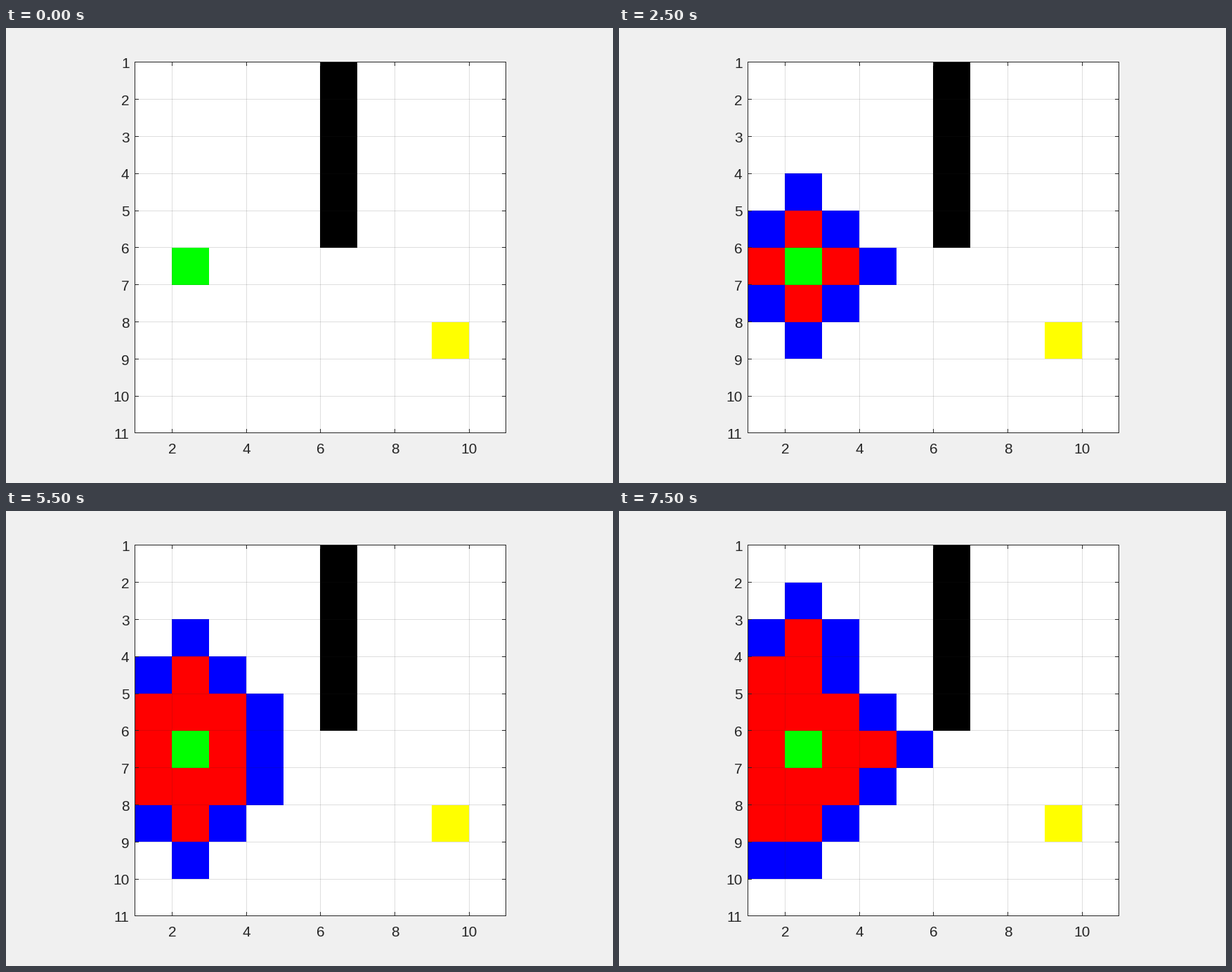
A matplotlib script for the animation above (8000 ms loop, 864 px wide and 648 px high).

```python
import math

import matplotlib.pyplot as plt
from matplotlib.animation import FuncAnimation
from matplotlib.patches import Rectangle

W, H, DPI = 864, 648, 100
N, STEPS = 10, 16
CELL, LEFT, TOP = 52.812, 183.26, 48.82
INK = (0.15, 0.15, 0.15)
START, GOAL = (2, 6), (9, 8)          # (column, row)
WALL = {(6, row) for row in range(1, 6)}


def edge_x(v):
    return math.floor(LEFT + CELL * (v - 1) + 0.5)


def edge_y(v):
    return math.floor(TOP + CELL * (v - 1) + 0.5)


def line_y(v):
    return math.floor(TOP + CELL * (v - 1))


def search():
    """Dijkstra's algorithm; returns the (visited, frontier) pair of each step."""
    dist, visited, states = {START: 0}, set(), []
    for _ in range(STEPS):
        frontier = set(dist) - visited
        states.append((set(visited), frontier))
        col, row = node = min(frontier, key=lambda c: (dist[c], c))
        visited.add(node)
        for near in ((col - 1, row), (col + 1, row), (col, row - 1), (col, row + 1)):
            if near not in WALL and all(1 <= v <= N for v in near):
                dist.setdefault(near, dist[node] + 1)
    return states


fig = plt.figure(figsize=(W / DPI, H / DPI), dpi=DPI, facecolor="#f0f0f0")
ax = fig.add_axes([0, 0, 1, 1])
ax.set_xlim(0, W)
ax.set_ylim(H, 0)
ax.axis("off")


def box(x0, y0, x1, y1, color, z, alpha=1):
    patch = Rectangle((x0, y0), x1 - x0, y1 - y0, facecolor=color,
                      linewidth=0, alpha=alpha, zorder=z)
    return ax.add_patch(patch)


def hline(y, x0, x1, z=4, alpha=1):
    box(x0, y, x1, y + 1, INK, z, alpha)


def vline(x, y0, y1, z=4, alpha=1):
    box(x, y0, x + 1, y1, INK, z, alpha)


def label(x, y, value, align):
    ax.text(x, y, str(value), fontsize=15, family="Liberation Sans",
            color=INK, ha=align, va="baseline")


x0, x1 = edge_x(1), edge_x(N + 1)
y0, y1 = line_y(1), line_y(N + 1)
TICK = 6

box(x0, y0, x1 + 1, y1 + 1, "white", 1)
cells = {(c, r): box(edge_x(c), edge_y(r), edge_x(c + 1), edge_y(r + 1), "white", 2)
         for c in range(1, N + 1) for r in range(1, N + 1)}

# grid, inward ticks and labels
for v in range(1, N + 2):
    y = line_y(v)
    if 1 < v <= N:
        hline(y, x0 + 1, x1, 3, 0.15)
    hline(y, x0, x0 + TICK)
    hline(y, x1 + 1 - TICK, x1 + 1)
    label(175.5, TOP + CELL * (v - 1) + 8.2, v, "right")

for v in range(2, N + 1, 2):
    x = edge_x(v)
    vline(x, y0 + 1, y1, 3, 0.15)
    vline(x, y0, y0 + TICK)
    vline(x, y1 + 1 - TICK, y1 + 1)
    label(x + 0.5, 606.3, v, "center")

for y in (y0, y1):
    hline(y, x0, x1 + 1)
for x in (x0, x1):
    vline(x, y0, y1 + 1)

states = search()


def color_of(cell, visited, frontier):
    if cell == START:
        return "#00ff00"
    if cell == GOAL:
        return "#ffff00"
    if cell in WALL:
        return "black"
    if cell in visited:
        return "#ff0000"
    return "#0000ff" if cell in frontier else "white"


def draw(i):
    for cell, patch in cells.items():
        patch.set_facecolor(color_of(cell, *states[i]))
    return list(cells.values())


anim = FuncAnimation(fig, draw, frames=STEPS, interval=500, repeat=True,
                     repeat_delay=0, blit=False)
plt.show()
```
